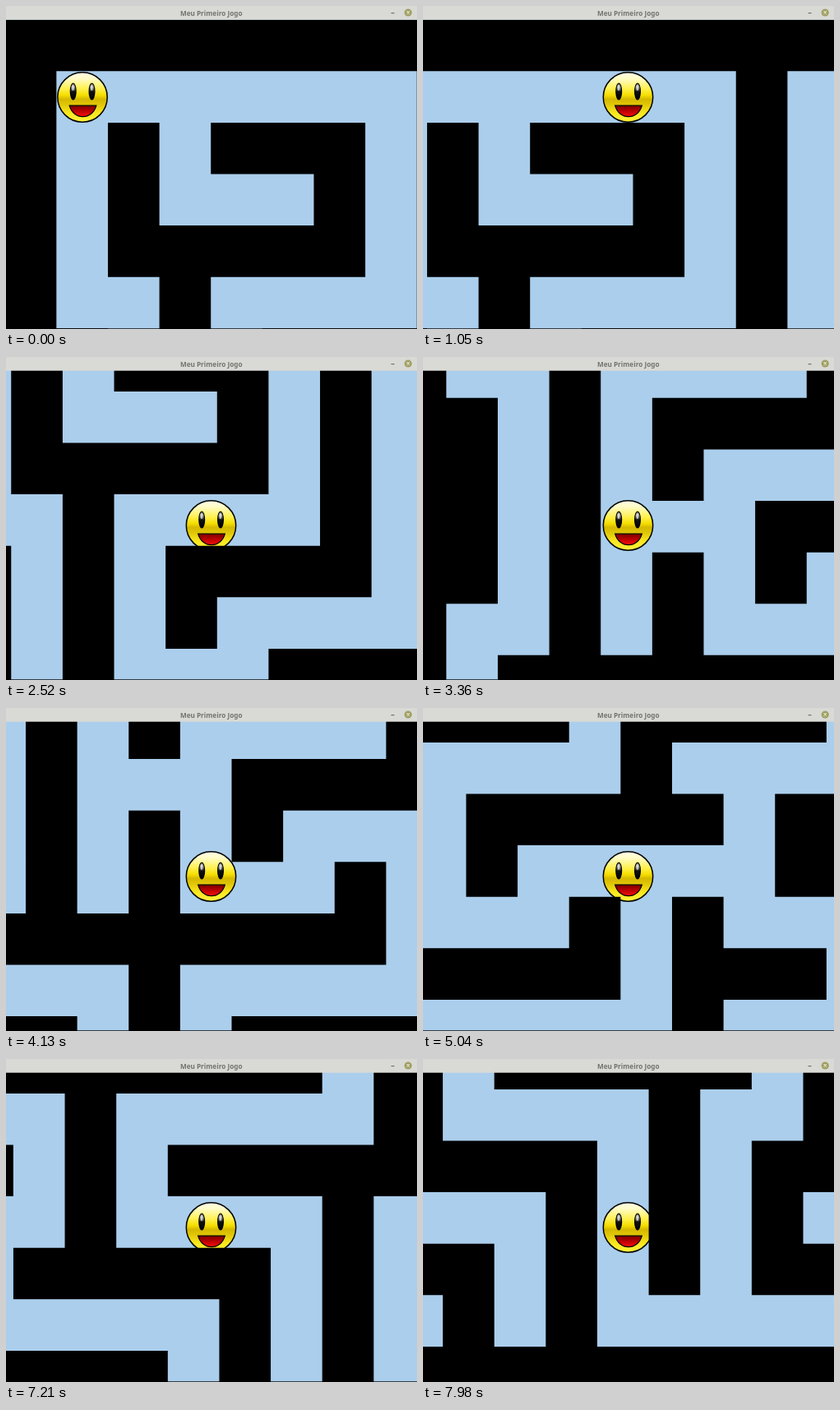
Animation of 500 by 393 pixels, one loop 8 s. Source, as an HTML page with a canvas:

```html
<!DOCTYPE html>
<html lang="pt">
<head>
<meta charset="utf-8">
<title>Meu Primeiro Jogo</title>
<style>
  html, body { margin: 0; width: 100%; height: 100%; overflow: hidden; background: #000; }
  canvas { display: block; }
</style>
</head>
<body>
<canvas id="stage" width="500" height="393"></canvas>
<script>
const ctx = document.getElementById('stage').getContext('2d');
const LOOP = 8000, STEP = 70;
const TILE_W = 62.63, TILE_H = 62.6, LEFT = -1.3, TOP = 16.7, BOTTOM = 392.3;
const CENTER = { x: 249.5, y: 205 };

const maze = [
  '################',
  '#.......#......#',
  '#.#.###.#.####.#',
  '#.#...#.#.#....#',
  '#.#####.#.#.####',
  '#..#....#.#....#',
  '##.#.####.####.#',
  '##.#.#....#....#',
  '##.#...#####.###',
  '##.#.#.#.....###',
  '#..#.#...#.#...#',
  '#.########.###.#',
  '#....#.....#...#',
  '####.#.#####.###',
  '###..#....#..###',
  '###.#####.#.####',
  '###.....#.#.#..#',
  '#######.#.#.####',
  '#.....#.#......#',
  '################'
];

// Each leg is walked at constant speed between its two times.
const legs = [
  { from: 175, to: 1050, points: [[93, 111], [368.5, 111]] },
  { from: 1050, to: 2520, points: [[368.5, 111], [470, 111], [470, 367.6], [367.2, 367.6]] },
  { from: 2520, to: 4130, points: [[367.2, 367.6], [282.5, 367.6], [282.5, 555], [412.1, 555], [412.1, 660.4]] },
  { from: 4130, to: 5950, points: [[412.1, 660.4], [412.1, 671], [536, 671], [536, 618], [660, 618], [660, 805.8], [588, 805.8]] },
  { from: 5950, to: 7210, points: [[588, 805.8], [404, 805.8], [404, 931], [489.8, 931]] },
  { from: 7210, to: 7980, points: [[489.8, 931], [599.9, 931], [599.9, 1061.2]] }
];

function walk(points, share) {
  const lengths = points.slice(1).map(([x, y], i) => Math.hypot(x - points[i][0], y - points[i][1]));
  let left = share * lengths.reduce((a, b) => a + b, 0);
  let i = 0;
  while (i < lengths.length - 1 && left > lengths[i]) left -= lengths[i++];
  const k = Math.min(1, left / lengths[i]);
  const [a, b] = [points[i], points[i + 1]];
  return { x: a[0] + (b[0] - a[0]) * k, y: a[1] + (b[1] - a[1]) * k };
}

function playerAt(time) {
  const leg = legs.find(l => time <= l.to) || legs[legs.length - 1];
  const share = (time - leg.from) / (leg.to - leg.from);
  return walk(leg.points, Math.min(1, Math.max(0, share)));
}

function vertical(y0, y1, stops) {
  const g = ctx.createLinearGradient(0, y0, 0, y1);
  stops.forEach(([at, color]) => g.addColorStop(at, color));
  return g;
}

const skin = vertical(-31, 31, [
  [0, '#ffffee'], [0.14, '#fffbc4'], [0.34, '#fff04a'], [0.46, '#f6de00'],
  [0.54, '#d5b800'], [0.64, '#e0c606'], [0.82, '#fbe920'], [1, '#fff23c']
]);
const eye = vertical(-17, 4, [[0, '#555'], [0.2, '#999'], [0.5, '#111'], [1, '#000']]);
const lips = vertical(10, 24, [[0, '#780000'], [0.45, '#b80000'], [1, '#ff1010']]);

function fillEllipse(x, y, rx, ry, color) {
  ctx.beginPath();
  ctx.ellipse(x, y, rx, ry, 0, 0, 7);
  ctx.fillStyle = color;
  ctx.fill();
}

function drawFace(x, y) {
  ctx.save();
  ctx.translate(x, y);
  ctx.strokeStyle = '#000';
  ctx.lineWidth = 1.5;
  fillEllipse(0, 0, 30.2, 30.2, skin);
  ctx.stroke();

  for (const side of [-11.3, 11.5]) {
    fillEllipse(side, -7, 4, 10.5, '#000');
    fillEllipse(side, -8, 2.8, 8.5, eye);
    fillEllipse(side - 0.2, -11.5, 1.4, 3.4, 'rgba(255,255,255,.65)');
  }

  ctx.beginPath();
  ctx.moveTo(-15.8, 10.2);
  ctx.lineTo(16.8, 10.2);
  ctx.bezierCurveTo(12, 28.2, -11, 28.2, -15.8, 10.2);
  ctx.closePath();
  ctx.fillStyle = lips;
  ctx.fill();
  ctx.lineWidth = 1.3;
  ctx.stroke();
  ctx.restore();
}

// One path for each run of walls keeps soft edges without seams between tiles.
function drawWalls(camX, camY) {
  ctx.beginPath();
  maze.forEach((row, r) => {
    for (const run of row.matchAll(/#+/g)) {
      ctx.rect(LEFT + run.index * TILE_W - camX, TOP + r * TILE_H - camY, run[0].length * TILE_W, TILE_H);
    }
  });
  ctx.fillStyle = '#000';
  ctx.fill();
}

function drawTitleBar() {
  ctx.fillStyle = '#d9dad5';
  ctx.fillRect(0, 0, 500, TOP);
  ctx.fillStyle = '#737472';
  ctx.font = 'bold 8.2px "Noto Sans", "Open Sans", sans-serif';
  ctx.textAlign = 'center';
  ctx.fillText('Meu Primeiro Jogo', 249.7, 11.7);
  ctx.fillRect(468.5, 8, 4, 1.2);

  fillEllipse(489.2, 8, 4.6, 4.6, '#a0a064');
  ctx.beginPath();
  for (const d of [-1.6, 1.6]) {
    ctx.moveTo(489.2 - d, 6.4);
    ctx.lineTo(489.2 + d, 9.6);
  }
  ctx.strokeStyle = '#f2f2e6';
  ctx.lineWidth = 1.1;
  ctx.stroke();
}

function render(time) {
  const player = playerAt(Math.floor(time / STEP) * STEP);
  const camX = Math.max(0, player.x - CENTER.x);
  const camY = Math.max(0, player.y - CENTER.y);
  ctx.fillStyle = '#abceec';
  ctx.fillRect(0, 0, 500, 393);
  drawFace(player.x - camX, player.y - camY);
  drawWalls(camX, camY);
  ctx.fillStyle = '#000';
  ctx.fillRect(0, BOTTOM, 500, 1);
  drawTitleBar();
}

function tick() {
  render(performance.now() % LOOP);
  requestAnimationFrame(tick);
}
tick();
</script>
</body>
</html>
```
